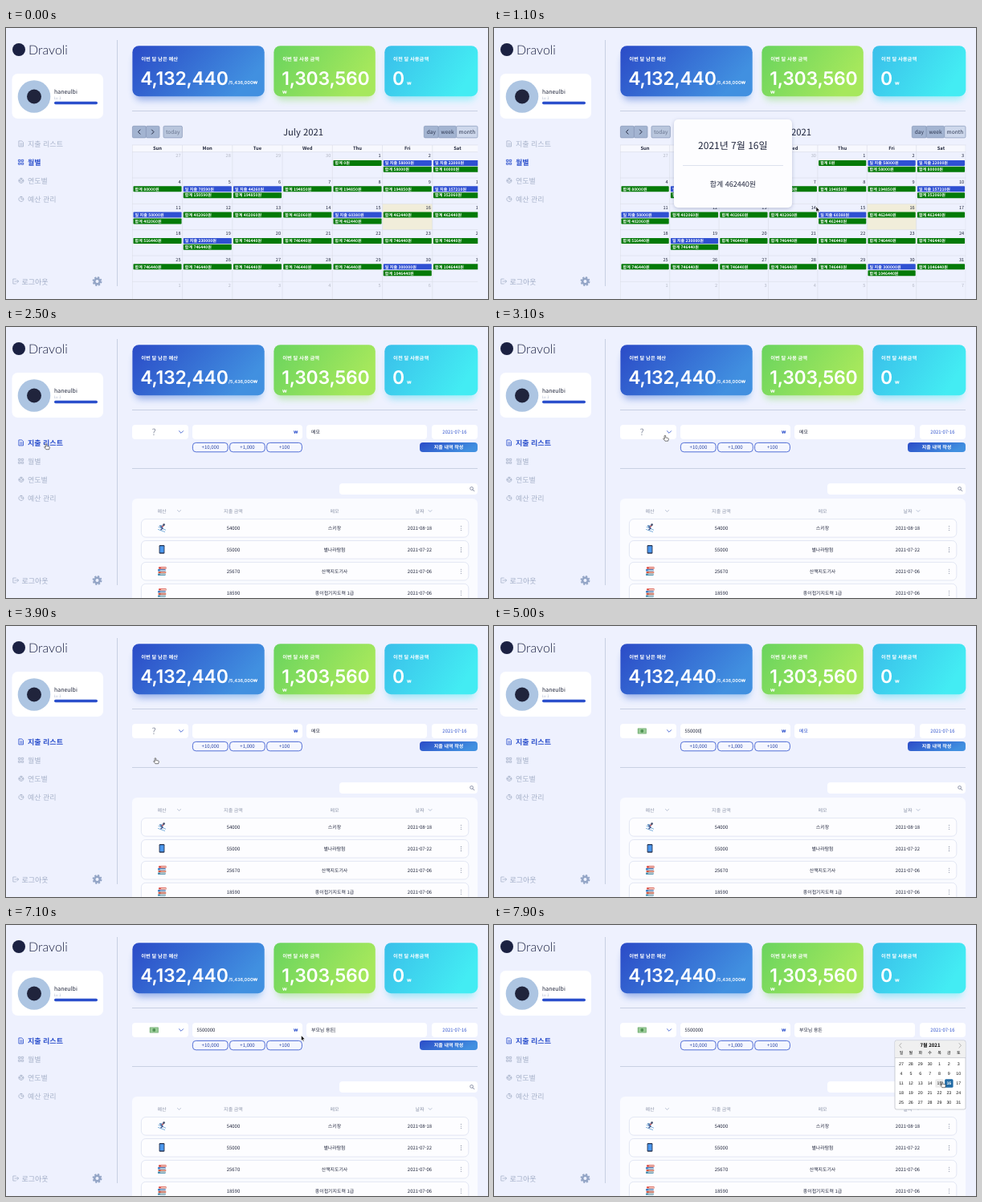
Animation, 600 px wide and 338 px high, one loop 8 s. Source, as an HTML page:

```html
<!DOCTYPE html>
<html lang="ko">
<head>
<meta charset="utf-8">
<title>Budget</title>
<style>
html, body { margin: 0; width: 100%; height: 100%; overflow: hidden; background: #eef1fe; }
svg { display: block; position: absolute; left: 0; top: 0; }
text { font-family: "Noto Sans CJK KR", "Noto Sans KR", "Noto Sans", sans-serif; text-rendering: geometricPrecision; white-space: pre; }
.num { font-family: Inter, sans-serif; }
.logo { font-family: Lato, sans-serif; font-weight: 300; }
.date { font-family: "Liberation Sans", Arial, sans-serif; }
</style>
</head>
<body>
<svg id="stage" width="600" height="338" viewBox="0 0 600 338">
  <defs>
    <linearGradient id="blue" x2="1" y2=".35"><stop stop-color="#2b4bc7"/><stop offset="1" stop-color="#4190e0"/></linearGradient>
    <linearGradient id="green" x2="1" y2=".35"><stop stop-color="#6ad45e"/><stop offset="1" stop-color="#a6e85c"/></linearGradient>
    <linearGradient id="cyan" x2="1" y2=".35"><stop stop-color="#3abfea"/><stop offset="1" stop-color="#43ecf3"/></linearGradient>
    <filter id="glow" x="-20%" y="-30%" width="140%" height="170%"><feGaussianBlur stdDeviation="4"/></filter>
    <filter id="soft" x="-10%" y="-10%" width="120%" height="125%"><feGaussianBlur stdDeviation="2.5"/></filter>
    <clipPath id="grid"><rect x="157" y="145" width="430.3" height="193"/></clipPath>
  </defs>
</svg>
<script>
const LOOP = 8000;
const BLUE = '#2b4fcc', INK = '#20263c', MUTED = '#a8b3ca', LINE = '#c8d0e2';
const stage = document.getElementById('stage');

function add(parent, tag, attrs) {
  const n = document.createElementNS('http://www.w3.org/2000/svg', tag);
  for (const k in attrs) n.setAttribute(k, attrs[k]);
  return parent.appendChild(n);
}
const group = (parent, attrs) => add(parent, 'g', attrs);
const box = (p, x, y, width, height, fill, rx = 0, more) => add(p, 'rect', { x, y, width, height, fill, rx, ...more });
const dot = (p, cx, cy, r, fill, more) => add(p, 'circle', { cx, cy, r, fill, ...more });
const path = (p, d, stroke, width = 1, fill = 'none') =>
  add(p, 'path', { d, stroke, fill, 'stroke-width': width, 'stroke-linecap': 'round', 'stroke-linejoin': 'round' });
const rule = (p, x1, y1, x2, y2, stroke = LINE, w = 1) => add(p, 'line', { x1, y1, x2, y2, stroke, 'stroke-width': w });

// y is the vertical middle of the glyphs
function label(p, str, x, y, size, fill = INK, more = {}) {
  const n = add(p, 'text', { x, y: y + size * .365, 'font-size': size, fill, ...more });
  n.textContent = str;
  return n;
}
const MID = { 'text-anchor': 'middle' }, END = { 'text-anchor': 'end' };
const BOLD = { 'font-weight': 700 }, MEDIUM = { 'font-weight': 500 };
const chevron = (p, x, y, s, color, w = 1) => path(p, `M${x - s} ${y - s / 2}l${s} ${s}l${s} ${-s}`, color, w);
const show = (n, on) => n.setAttribute('visibility', on ? 'visible' : 'hidden');

// ---- sidebar
const side = group(stage);
dot(side, 16, 27, 8, '#1b2142');
label(side, 'Dravoli', 28, 27, 16, '#1b2142', { class: 'logo' });
box(side, 7.5, 57, 113.5, 56, '#fff', 7);
dot(side, 35, 85.5, 20.3, '#adc5e2');
dot(side, 35, 85.5, 9, '#20243c');
label(side, 'haneulbi', 60, 79.5, 7, INK);
label(side, 'Lv.1', 60, 87, 4.6, MUTED);
box(side, 60, 91.8, 54, 3.4, BLUE, 1.7);
rule(side, 138.5, 15, 138.5, 322);

const ICONS = [
  'M1 0h4l2 2v6h-6zM2.6 3.6h2.8M2.6 5.8h2.8',
  'M.5 .5h2.4v2.4h-2.4zM4.8 .5h2.4v2.4h-2.4zM.5 4.9h2.4v2.4h-2.4zM4.8 4.9h2.4v2.4h-2.4z',
  'M4 .5a3.5 3.5 0 1 0 .01 0zM4 2.2a1.8 1.8 0 1 0 .01 0zM.8 4h1.4M5.8 4h1.4',
  'M4 .5a3.5 3.5 0 1 0 .01 0zM4 .8v3.2h3'
];
const menu = ['지출 리스트', '월별', '연도별', '예산 관리'].map((name, i) => {
  const y = 144.4 + 23 * i, g = group(side);
  return [false, true].map(active => {
    const s = group(g), color = active ? BLUE : MUTED;
    path(group(s, { transform: `translate(15.4 ${y - 3.5}) scale(.87)` }), ICONS[i], color, .95);
    label(s, name, 27, y, 9, color, active ? BOLD : MEDIUM);
    return s;
  });
});
path(side, 'M12.2 313h-3.4v6h3.4M11 316h4.6M13.8 314.2l1.8 1.8l-1.8 1.8', MUTED, .8);
label(side, '로그아웃', 19.5, 316.3, 9, '#a0acc5');
dot(side, 113.5, 316, 3.3, 'none', { stroke: '#93a5c6', 'stroke-width': 2.6 });
dot(side, 113.5, 316, 5.1, 'none', { stroke: '#93a5c6', 'stroke-width': 1.7, 'stroke-dasharray': '2.2 1.805' });

// ---- summary cards
function card(x, w, fill, title, amount) {
  box(stage, x + 3, 32, w - 6, 58, `url(#${fill})`, 8, { filter: 'url(#glow)', opacity: .45 });
  box(stage, x, 22.2, w, 63, `url(#${fill})`, 8);
  label(stage, title, x + 10.8, 39, 6.3, '#fff', BOLD);
  label(stage, amount, x + 9.8, 62.5, 23, '#fff', { class: 'num', 'font-weight': 600, 'letter-spacing': -.25 });
}
const small = (s, x, y) => label(stage, s, x, y, 5.6, '#fff', { class: 'num', 'font-weight': 600 });
card(157.4, 164.3, 'blue', '이번 달 남은 예산', '4,132,440');
card(333.4, 126.4, 'green', '이번 달 사용 금액', '1,303,560');
card(471.3, 116, 'cyan', '이전 달 사용금액', '0');
small('/5,436,000₩', 277, 68);
small('₩', 344, 79.5);
small('₩', 499, 68.5);
rule(stage, 157, 103.5, 587, 103.5);

// ---- month page
const month = group(stage);
const BTN = '#a3b4d1', EDGE = '#8697b8';
function button(x, w, fill, text) {
  box(month, x, 122.3, w, 14.6, fill, 1.5, { stroke: EDGE, 'stroke-width': .7 });
  if (text) label(month, text, x + w / 2, 129.5, 6.6, '#2b3550', MID);
}
button(157.4, 17, BTN);
button(174.4, 16.6, BTN);
path(month, 'M167 127l-2.5 2.6l2.5 2.6M181.5 127l2.5 2.6l-2.5 2.6', INK, 1);
button(196, 23.4, '#b9c6dd');
label(month, 'today', 207.7, 129.5, 6.6, '#68748e', MID);
button(520.3, 18, BTN, 'day');
button(538.3, 22.4, BTN, 'week');
button(560.7, 26.3, '#ced8ec', 'month');
label(month, 'July 2021', 370, 130, 11.3, INK, { ...MID, ...MEDIUM });

const SPENT = { 2: 58000, 3: 22000, 5: 70590, 6: 44260, 10: 157210, 11: 50000, 15: 60380, 18: 54000, 19: 230000, 30: 300000 };
const TOP = 154.6, ROW = 32.35;
function calendar(colW) {
  const g = group(month, { 'clip-path': 'url(#grid)' });
  box(g, 157, 146, colW * 7, TOP - 146, '#f7f8fe');
  let total = 0;
  for (let i = 0; i < 42; i++) {
    const c = i % 7, x = 157.3 + c * colW, y = TOP + Math.floor(i / 7) * ROW;
    const day = i - 3, inside = day > 0 && day < 32;
    if (day === 16) box(g, x, y, colW, ROW, '#f1edda');
    label(g, inside ? day : (day < 1 ? day + 30 : day - 31), x + colW - 2, y + 4.7, 5.6, inside ? INK : '#b3b7c4', END);
    if (!inside) continue;
    let ey = y + 10.3;
    const event = (text, fill) => {
      box(g, x + 1.2, ey, colW - 2.2, 7, fill, .8);
      label(g, text, x + 3.3, ey + 3.5, 5, '#fff', BOLD);
      ey += 7.9;
    };
    const spent = SPENT[day] || 0;
    total += spent;
    if (spent && day !== 18) event(`일 지출 ${spent}원`, '#2f50d2');
    event(`합계 ${total}원`, '#047a08');
  }
  ['Sun', 'Mon', 'Tue', 'Wed', 'Thu', 'Fri', 'Sat'].forEach((d, c) =>
    label(g, d, 157.3 + (c + .5) * colW, 150.3, 5.8, INK, { ...MID, ...BOLD }));
  for (let c = 0; c <= 7; c++) rule(g, 157.3 + c * colW, 146, 157.3 + c * colW, 338, '#d9dce6', .6);
  for (let r = 0; r < 6; r++) rule(g, 157, TOP + r * ROW, 600, TOP + r * ROW, '#d9dce6', .6);
  rule(g, 157, 146, 600, 146, '#d9dce6', .6);
  return g;
}
const wide = calendar(62.25), fitted = calendar(61.4);

// ---- day dialog
const dialog = group(stage);
box(dialog, 224, 115.5, 147, 110, '#5d6b93', 5, { filter: 'url(#soft)', opacity: .35 });
box(dialog, 224, 114, 147, 110, '#fdfdff', 5);
label(dialog, '2021년 7월 16일', 297.3, 147, 12, INK, MID);
rule(dialog, 235, 171.5, 360, 171.5, '#d6dcea', .8);
label(dialog, '합계 462440원', 297.3, 195, 9, INK, MID);

// ---- list page
const list = group(stage);
[[157, 70], [232, 137], [374, 150], [530, 57]].forEach(([x, w]) => box(list, x, 122, w, 18, '#fff', 4));
const unset = label(list, '?', 184, 131, 11, '#8f95a6', MID);
chevron(list, 218, 131, 2.6, BLUE, .85);
label(list, '₩', 360.7, 131, 5.4, BLUE, { ...MID, class: 'num', 'font-weight': 600 });
label(list, '2021-07-16', 558.5, 131, 5.9, BLUE, MID);
['+10,000', '+1,000', '+100'].forEach((s, i) => {
  const x = 232.4 + 46.1 * i;
  box(list, x, 144.4, 43.8, 11.4, '#f4f6ff', 4, { stroke: BLUE, 'stroke-width': .8 });
  label(list, s, x + 22, 150.2, 6, '#2a45a4', { ...MID, ...MEDIUM });
});
box(list, 515, 144, 72, 12, 'url(#blue)', 4);
label(list, '지출 내역 작성', 551, 150.2, 6, '#fff', { ...MID, ...BOLD });
rule(list, 157, 176.5, 587, 176.5);
box(list, 415, 195, 172, 14, '#fff', 4);
dot(list, 579.6, 201.4, 1.9, 'none', { stroke: '#4a5577', 'stroke-width': .6 });
path(list, 'M581.1 202.9l1.8 1.8', '#4a5577', .7);

box(list, 157, 214, 430, 130, '#fafbff', 6);
[['예산', 194], ['지출 금액', 283], ['메모', 409], ['날짜', 515]].forEach(([s, x]) => label(list, s, x, 229.5, 6, '#8e96aa', MID));
chevron(list, 215.5, 229.5, 2, MUTED, .8);
chevron(list, 528, 229.5, 2, MUTED, .8);

const pictures = {
  ski(g) {
    path(g, 'M-4.5 2L3.6 5M-4 -1L4.6 2.6', '#5a9bd2', .8);
    path(g, 'M-1 2.3l2-1.8l-2-1.6', '#3a4f88', 1.5);
    path(g, 'M-.5 -1l2.6-1.8M1.6 -2l-4-.4', '#4d7fb5', 1.5);
    path(g, 'M.4 -1.4l1.4-1', '#d8534f', 1.2);
    dot(g, 2.6, -3.9, 1.4, '#45506e');
  },
  phone(g) {
    box(g, -3.4, -5.4, 6.8, 10.8, '#2a3552', 1.2);
    box(g, -2.5, -4.1, 5, 8, '#4a97ee');
  },
  books(g) {
    [['#d94c45', -4, -5], ['#3f7fc4', -5, -2.2], ['#d4573f', -4.4, .6], ['#4a8fb0', -5, 3.2]].forEach(([c, x, y]) => {
      box(g, x, y, 9.6, 2.4, c, .6);
      box(g, x + 3, y + .8, 6.2, .8, '#f3ead8');
    });
  },
  money(g) {
    box(g, -5.5, -3.6, 11, 7.2, '#6fab70', .5);
    box(g, -4.6, -2.8, 9.2, 5.6, '#9acb97');
    dot(g, 0, 0, 1.9, '#4f9153');
  }
};
const picture = (name, x, y) => {
  const g = group(list, { transform: `translate(${x} ${y})` });
  pictures[name](g);
  return g;
};
[['ski', 54000, '스키장', '2021-08-18'], ['phone', 55000, '별나라탐험', '2021-07-22'],
 ['books', 25670, '산책지도기사', '2021-07-06'], ['books', 18590, '종이접기지도력 1급', '2021-07-06']].forEach(([pic, cost, memo, date], i) => {
  const y = 251 + 26.9 * i;
  box(list, 168.4, y - 11.4, 407.4, 22.6, '#fdfdff', 5.5, { stroke: '#dce1f0', 'stroke-width': .8 });
  picture(pic, 194, y - .5);
  label(list, cost, 283, y, 5.9, INK, MID);
  label(list, memo, 409, y, 5.9, INK, MID);
  label(list, date, 515, y, 5.9, INK, MID);
  [-2.5, 0, 2.5].forEach(d => dot(list, 566.5, y + d, .55, '#7d869c'));
});
const money = picture('money', 184.3, 131);

function field(x, hint) {
  return {
    text: label(list, '', x, 131, 5.9),
    hint: label(list, hint, x, 131, 5.9),
    caret: rule(list, 0, 127.8, 0, 134.4, INK, .5),
    under: rule(list, 0, 134.6, 0, 134.6, INK, .6),
    set(value, focused, composing) {
      this.text.textContent = value;
      this.hint.style.display = value ? 'none' : '';
      this.hint.setAttribute('fill', chosenColor);
      const w = value ? this.text.getComputedTextLength() : 0;
      this.caret.setAttribute('x1', x + w + .4);
      this.caret.setAttribute('x2', x + w + .4);
      this.under.setAttribute('x1', x + w - 5.4);
      this.under.setAttribute('x2', x + w);
      this.caret.style.display = focused ? '' : 'none';
      this.under.style.display = composing ? '' : 'none';
    }
  };
}
let chosenColor = INK;
const amount = field(237.5, ''), memo = field(380, '메모');

// ---- date picker
const picker = group(stage);
const dayX = c => 507 + 11.87 * c, dayY = r => 173.5 + 12 * r;
box(picker, 499, 144, 88, 86, '#fff', 2, { stroke: '#b6b9c0', 'stroke-width': .7 });
box(picker, 499.4, 144.4, 87.2, 21, '#f0f0f0', 1.5);
rule(picker, 499, 165.6, 587, 165.6, '#b6b9c0', .6);
path(picker, 'M507 147.5l-2.4 2.8l2.4 2.8M579 147.5l2.4 2.8l-2.4 2.8', '#b3b3b3', 1);
label(picker, '7월 2021', 543, 150.3, 6, '#000', { ...MID, ...BOLD });
[...'일월화수목금토'].forEach((d, c) => label(picker, d, dayX(c), 159.5, 5, '#000', MID));
const hover = box(picker, 0, 0, 10.4, 10.4, '#ececec', 1.5);
box(picker, dayX(5) - 5.2, dayY(2) - 5.2, 10.4, 10.4, '#216ba5', 1.5);
for (let i = 0; i < 35; i++) {
  const d = i - 3;
  label(picker, d < 1 ? d + 30 : d, dayX(i % 7), dayY(Math.floor(i / 7)), 5.3, d === 16 ? '#fff' : '#111',
    { ...MID, class: 'date', 'font-weight': d === 16 ? 700 : 400 });
}

// ---- pointer
const pointer = group(stage);
const arrow = path(pointer, 'M0 0v6.4l1.5-1.3l1 2.2l1-.5l-1-2.1h2z', '#fff', .5, '#111');
const hand = path(pointer, 'M-.8 0q.8-.8 1.5 0v2.4l3 .7q.7.3.6 1l-.6 2.6h-3.8l-2.3-3q.3-1 1.6 0z', '#222', .6, '#fff');

const TRACK = [ // time, x, y
  [100, 160, 185], [500, 480, 233], [700, 480, 233], [1050, 401, 223], [1900, 401, 223],
  [2000, 338.5, 211], [2400, 50, 146], [2600, 50, 146], [3050, 213, 135.5], [3400, 213, 135.5],
  [3700, 186, 165], [4000, 186, 165], [4200, 262, 132], [4400, 262, 132],
  [7000, 300, 140], [7300, 556, 132], [7450, 556, 132], [7900, 558, 196], [8000, 558, 196]
];
const ease = u => u * u * (3 - 2 * u);
function at(t) {
  const i = TRACK.findIndex(k => k[0] > t);
  if (i < 1) return TRACK[i < 0 ? TRACK.length - 1 : 0].slice(1);
  const [a, x, y] = TRACK[i - 1], [b, x2, y2] = TRACK[i], u = ease((t - a) / (b - a));
  return [x + (x2 - x) * u, y + (y2 - y) * u];
}

// Hangul composition states while the memo is typed
const MEMO = [[5880, 'ㅂ'], [5950, '부'], [6020, '붐'], [6080, '부모'], [6180, '부몬'], [6260, '부모니'], [6340, '부모님'],
  [6420, '부모님 '], [6480, '부모님 ㅇ'], [6540, '부모님 요'], [6600, '부모님 용'], [6660, '부모님 용ㄷ'], [6720, '부모님 용도'], [6790, '부모님 용돈']];

function draw(t) {
  const onList = t >= 2500;
  show(month, !onList);
  show(list, onList);
  show(wide, !onList && t < 200);
  show(fitted, !onList && t >= 200);
  show(dialog, t >= 650 && t < 1750);
  menu.forEach(([off, on], i) => {
    const active = i === (onList ? 0 : 1);
    show(off, !active);
    show(on, active);
  });

  const chosen = t >= 3950;
  show(unset, onList && !chosen);
  show(money, onList && chosen);
  chosenColor = chosen ? BLUE : INK;
  const typed = Math.max(0, Math.min(7, Math.floor((t - 4380) / 100)));
  amount.set('5500000'.slice(0, typed), t >= 4300 && t < 5300, false);
  const state = MEMO.filter(s => s[0] <= t).pop();
  memo.set(state ? state[1] : '', t >= 5300 && t < 7300, state && t < 6900 && !state[1].endsWith(' '));

  const [x, y] = at(t);
  pointer.setAttribute('transform', `translate(${x} ${y})`);
  pointer.style.display = t < 100 || (t >= 4400 && t < 7000) ? 'none' : '';
  const onHand = (t >= 2350 && t < 2650) || (t >= 3000 && t < 4050) || t >= 7600;
  show(arrow, !onHand);
  show(hand, onHand);

  const open = t >= 7450;
  show(picker, open);
  const c = Math.round((x - dayX(0)) / 11.87), r = Math.round((y - dayY(0)) / 12);
  show(hover, open && r >= 0);
  hover.setAttribute('x', dayX(c) - 5.2);
  hover.setAttribute('y', dayY(r) - 5.2);
}
function frame() {
  draw(performance.now() % LOOP);
  requestAnimationFrame(frame);
}
frame();
</script>
</body>
</html>
```
